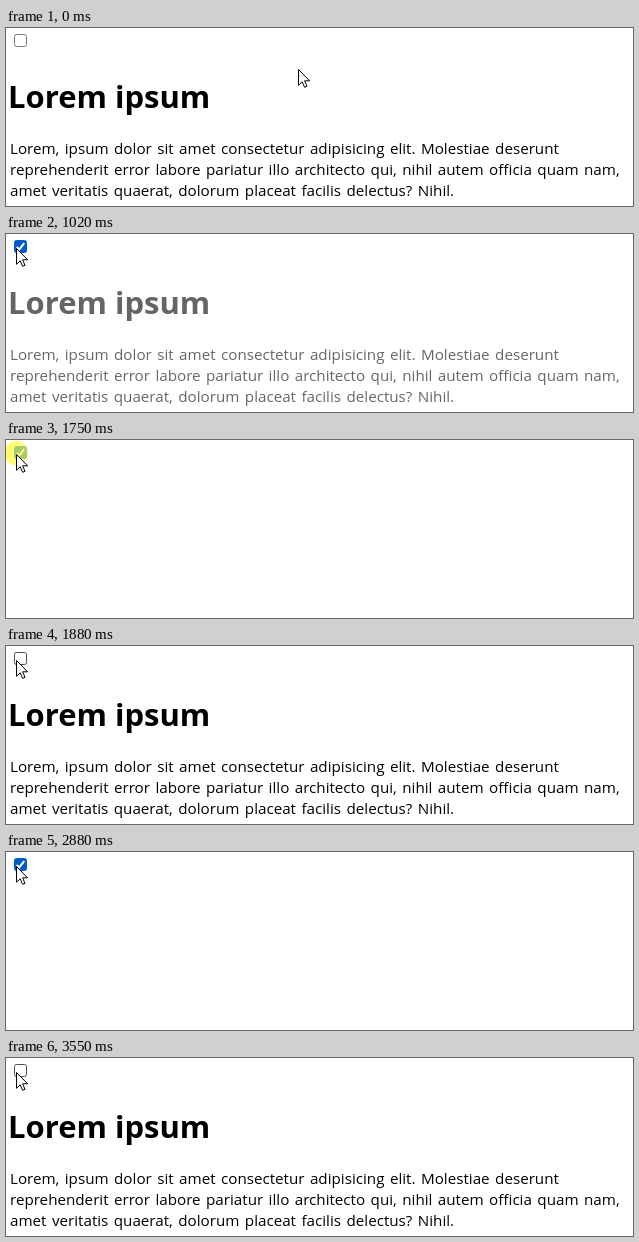
An HTML page for the animation above (3.88 s loop, 627 px wide and 178 px high).

```html
<!DOCTYPE html>
<html lang="en">
<head>
<meta charset="utf-8">
<title>Checkbox toggles text</title>
<style>
  html, body { margin: 0; width: 100%; height: 100%; overflow: hidden; background: #fff; }
  svg { display: block; }
  text { font-family: "Open Sans", "Noto Sans", sans-serif; }
  .title { font-size: 31px; font-weight: 700; }
  .body { font-size: 15.2px; word-spacing: 1.5px; }
</style>
</head>
<body>
<svg width="627" height="178" viewBox="0 0 627 178">
  <g id="content">
    <text class="title" x="2" y="80">Lorem ipsum</text>
    <g class="body">
      <text x="4" y="126">Lorem, ipsum dolor sit amet consectetur adipisicing elit. Molestiae deserunt</text>
      <text x="4" y="147">reprehenderit error labore pariatur illo architecto qui, nihil autem officia quam nam,</text>
      <text x="4" y="168">amet veritatis quaerat, dolorum placeat facilis delectus? Nihil.</text>
    </g>
  </g>
  <rect id="box" x="8.5" y="6.5" width="12" height="12" rx="2"/>
  <path id="check" d="M10.7 12.9l2.5 2.5 5-6.3" fill="none" stroke="#fff" stroke-width="2"/>
  <circle id="press" cx="10" cy="13" r="12" fill="#fffa00" fill-opacity=".55"/>
  <path id="cursor" d="M.5 .5V16.3L4.2 12.8 6.6 18.3 9 17.3 6.6 11.8H11.6Z" fill="#fff" stroke="#000"/>
</svg>
<script>
const LOOP = 3880;
const MOVE = { start: 260, step: 70, count: 7 };
const ARRIVAL = MOVE.start + MOVE.step * (MOVE.count - 1);

// Each state holds from its time until the next one.
const STATES = [
  { at: 0, opacity: 1 },
  { at: 880, opacity: 1, pressed: true },
  { at: 1010, opacity: .6, checked: true },
  { at: 1080, opacity: .25, checked: true },
  { at: 1150, opacity: 0, checked: true },
  { at: 1750, opacity: 0, checked: true, pressed: true },
  { at: 1820, opacity: .6 },
  { at: 1880, opacity: 1 },
  { at: 2610, opacity: 1, pressed: true },
  { at: 2750, opacity: .6, checked: true },
  { at: 2820, opacity: .25, checked: true },
  { at: 2880, opacity: 0, checked: true },
  { at: 3350, opacity: 0, checked: true, pressed: true },
  { at: 3480, opacity: .6 },
  { at: 3550, opacity: 1 }
];

const find = id => document.getElementById(id);
const set = (node, attributes) => {
  for (const name in attributes) node.setAttribute(name, attributes[name]);
};
const [content, box, check, press, cursor] =
  ["content", "box", "check", "press", "cursor"].map(find);

const smooth = p => p * p * (3 - 2 * p);
const bezier = (a, b, c, p) => (1 - p) ** 2 * a + 2 * p * (1 - p) * b + p * p * c;

function cursorPosition(t) {
  const steps = Math.floor((t - MOVE.start) / MOVE.step) + 1;
  const p = smooth(Math.min(Math.max(steps / MOVE.count, 0), 1));
  return [bezier(292, 200, 10, p), bezier(41, 53, 14, p)].map(Math.round);
}

function boxStyle(t, { checked, pressed }) {
  if (checked) {
    const blue = pressed ? "#3793ff" : "#005cc8";
    return { fill: blue, stroke: blue };
  }
  const border = pressed ? "#8d8d8d" : t >= ARRIVAL ? "#4f4f4f" : "#767676";
  return { fill: "#fff", stroke: border };
}

function draw(now) {
  const t = now % LOOP;
  const state = STATES.findLast(s => s.at <= t);
  set(content, { opacity: state.opacity });
  set(box, boxStyle(t, state));
  set(check, { visibility: state.checked ? "visible" : "hidden" });
  set(press, { visibility: state.pressed ? "visible" : "hidden" });
  set(cursor, { transform: `translate(${cursorPosition(t)})` });
}

const began = performance.now();
function tick() {
  draw(performance.now() - began);
  requestAnimationFrame(tick);
}
tick();
</script>
</body>
</html>
```
